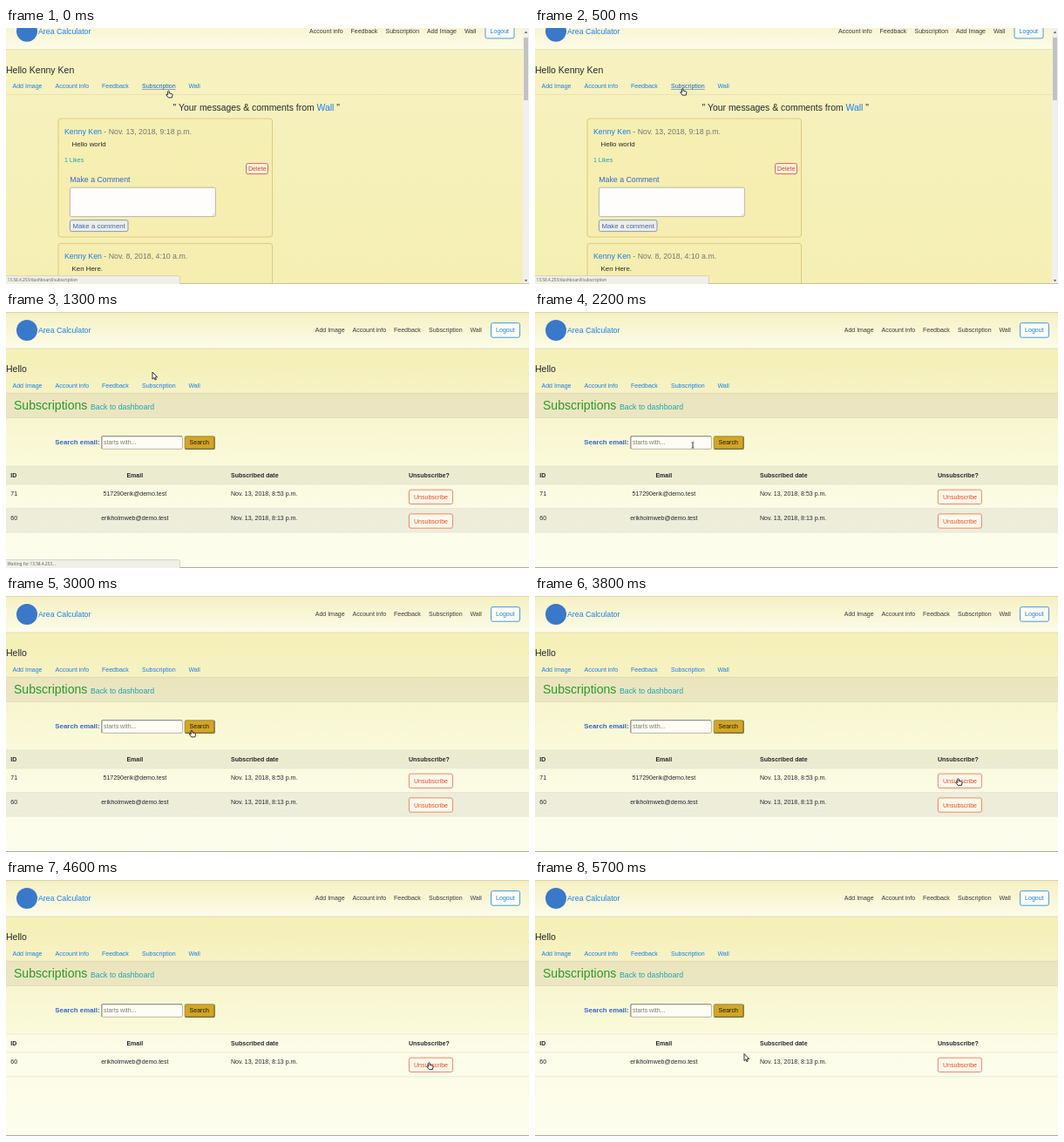
An HTML page with a canvas that plays this animation: 600x294 px, repeating every 5.8 s.

```html
<!DOCTYPE html>
<html lang="en">
<head>
<meta charset="utf-8">
<title>Subscriptions</title>
<style>
html, body { margin: 0; width: 100%; height: 100%; overflow: hidden; background: #f6f1bb; }
canvas { display: block; width: 600px; height: 294px; }
</style>
</head>
<body>
<canvas id="stage"></canvas>
<script>
const W = 600, H = 294, LOOP = 5800, STEP = 100;
const canvas = document.getElementById('stage');
const ctx = canvas.getContext('2d');
const dpr = window.devicePixelRatio || 1;
canvas.width = W * dpr;
canvas.height = H * dpr;

const SANS = '"Liberation Sans", Arial, sans-serif';
const UI = '"Noto Sans", sans-serif';
const BASE = 7.03, MID = 7.9, LEAD = 8.78, H4 = 10.5, H2 = 14.05;
const BLUE = '#1a7fe8', INK = '#25282b', GREY = '#74786f', TEAL = '#1fa3b0',
      ROYAL = '#3565cc', RED = '#d8404a', ORANGE = '#ea4a2c';
const USER = 'Kenny Ken', BRAND = 'Area Calculator';

// Draws text and returns the x where it ends.
function text(str, x, y, size = BASE, color = INK, opt = {}) {
  ctx.font = `${opt.bold ? 'bold ' : ''}${size}px ${opt.font || SANS}`;
  ctx.textAlign = opt.align || 'left';
  ctx.fillStyle = color;
  ctx.fillText(str, x, y);
  return x + ctx.measureText(str).width;
}

function rect(x, y, w, h, color) {
  ctx.fillStyle = color;
  ctx.fillRect(x, y, w, h);
}

function box(x, y, w, h, r, stroke, fill, line = 0.8) {
  ctx.beginPath();
  ctx.roundRect(x, y, w, h, r);
  if (fill) { ctx.fillStyle = fill; ctx.fill(); }
  ctx.lineWidth = line;
  ctx.strokeStyle = stroke;
  ctx.stroke();
}

function shade(y, h, ...colors) {
  const g = ctx.createLinearGradient(0, y, 0, y + h);
  colors.forEach((c, i) => g.addColorStop(i / (colors.length - 1), c));
  rect(0, y, W, h, g);
}

function poly(points, fill) {
  ctx.beginPath();
  points.forEach(([x, y]) => ctx.lineTo(x, y));
  ctx.closePath();
  ctx.fillStyle = fill;
  ctx.fill();
}

function header(top, right, links) {
  shade(top, 42, '#f5f0c0', '#f9f6d6', '#fdfce9');
  rect(0, top + 41.6, W, 0.8, '#dbd6ae');
  ctx.beginPath();
  ctx.arc(24, top + 21, 12, 0, Math.PI * 2);
  ctx.fillStyle = '#3a78c9';
  ctx.fill();
  text(BRAND, 37, top + 24, LEAD, BLUE);
  links.forEach(([label, x]) => text(label, x, top + 23.3, BASE, '#3a3b38'));
  box(right - 33, top + 12.6, 33, 16.6, 2, BLUE, '#fdfdf4');
  text('Logout', right - 27.4, top + 23.3, BASE, BLUE);
}

function tabs(y, hover) {
  const items = [['Add Image', 7.5], ['Account info', 56.5], ['Feedback', 110],
                 ['Subscription', 156], ['Wall', 209.5]];
  for (const [label, x] of items) {
    const on = hover === label;
    const end = text(label, x, y, BASE, on ? '#1263bd' : BLUE);
    if (on) rect(x, y + 0.8, end - x, 0.5, '#1263bd');
  }
}

function status(str) {
  box(-2, 284.6, 201.5, 12, 1.5, '#c9c8bd', '#f0efe8', 0.7);
  text(str, 1.5, 291.3, 4.75, '#66665f', { font: UI });
}

function cardHead(y, date, body) {
  const x = text(USER, 67, y + 17.7, LEAD, BLUE);
  text(' - ' + date, x, y + 17.7, LEAD, GREY);
  text(body, 75.5, y + 31.7, MID, INK);
}

function card(y) {
  box(60, y, 245.5, 136, 3, '#dcc378', 'rgba(245,236,168,0.45)', 0.9);
}

function scrollbar() {
  rect(593, 0, 7, H, '#f0f0ee');
  rect(594, 11, 5, 72, '#c2c2c0');
  poly([[594.8, 6], [598.2, 6], [596.5, 3.5]], '#666');
  poly([[594.8, 289], [598.2, 289], [596.5, 291.5]], '#666');
}

function dashboard(t) {
  shade(0, H, '#f7f2c2', '#f6f1bc', '#f5f0b7', '#f5efb4');
  header(-17.3, 583, [['Account info', 348], ['Feedback', 395.5],
    ['Subscription', 435.5], ['Add Image', 483], ['Wall', 526]]);
  text('Hello ' + USER, 0, 51.8, H4, INK);
  tabs(69.3, 'Subscription');
  rect(0, 76.2, 593, 0.7, '#e2ddb2');

  let x = text('" Your messages & comments from ', 191.5, 94.8, 10.4);
  x = text('Wall', x, 94.8, 10.4, BLUE);
  text(' "', x, 94.8, 10.4);

  card(104);
  cardHead(104, 'Nov. 13, 2018, 9:18 p.m.', 'Hello world');
  text('1 Likes', 67, 153.6, BASE, TEAL);
  box(275.5, 155.6, 25, 12, 2, RED, '#faf5d6');
  text('Delete', 278, 164.1, BASE, RED);
  text('Make a Comment', 73.3, 177.4, LEAD, ROYAL);
  box(73.4, 183.2, 167, 33.4, 2, '#a9a89c', '#fefdfb');
  ctx.beginPath();
  ctx.moveTo(236.6, 215.6); ctx.lineTo(239.4, 212.8);
  ctx.moveTo(238.2, 215.6); ctx.lineTo(239.4, 214.4);
  ctx.lineWidth = 0.5;
  ctx.stroke();
  box(73.4, 220.6, 66.6, 13, 2, '#6a7fd2', '#f0eee0');
  text('Make a comment', 76.4, 229.7, MID, ROYAL);

  card(247.4);
  cardHead(247.4, 'Nov. 8, 2018, 4:10 a.m.', 'Ken Here.');
  scrollbar();
  rect(0, 293.2, W, 0.8, '#b9b7a4');
  status(t < 700 ? '13.58.4.253/dashboard/subscription' : 'Waiting for 13.58.4.253...');
}

function row(y, [id, mail, date]) {
  text(id, 5.3, y + 13.4);
  text(mail, 147.8, y + 13.4, BASE, INK, { align: 'center' });
  text(date, 258, y + 13.4);
  box(462.4, y + 6.2, 50, 16.3, 2, '#ee6a4c', '#fdf9ea');
  text('Unsubscribe', 468, y + 16.8, BASE, ORANGE);
}

const PEOPLE = [
  ['71', '517290erik@demo.test', 'Nov. 13, 2018, 8:53 p.m.'],
  ['60', 'erikholmweb@demo.test', 'Nov. 13, 2018, 8:13 p.m.']
];

function subscriptions(t) {
  const full = t < 4600;
  shade(0, H, '#f4eeb4', '#f5efb9', '#f8f5cd', '#fafadb', '#fcfce8', '#fdfdee');
  header(0, 589.5, [['Add Image', 354.7], ['Account info', 397.5],
    ['Feedback', 445], ['Subscription', 485], ['Wall', 532.5]]);
  text('Hello', 0, 69, H4, INK);
  tabs(86.6);

  rect(0, 93, W, 28.4, 'rgba(226,219,184,0.55)');
  rect(0, 92.8, W, 0.7, '#dcd6b0');
  rect(0, 121, W, 0.7, '#dcd8b8');
  text('Subscriptions', 9, 111.8, H2, '#27992c');
  text('Back to dashboard', 97, 111.8, LEAD, TEAL);

  text('Search email:', 56.3, 152.3, MID, ROYAL, { bold: true });
  box(109.8, 142.6, 92.6, 14.8, 1.5, '#a5a499', '#fdfdf6');
  rect(110, 142.4, 92, 0.8, '#7f7e76');
  rect(109.5, 143, 0.8, 14, '#7f7e76');
  text('starts with...', 112, 152.2, BASE, '#7d7d78');
  box(205.2, 142.8, 34, 14.6, 1.5, '#8d7a3c', '#d3a524');
  rect(205.6, 156.8, 33.6, 0.9, '#5f5430');
  rect(238.7, 143.2, 0.8, 14, '#5f5430');
  text('Search', 210.6, 152.3, BASE, '#1d1a10');

  if (full) {
    rect(0, 177, W, 21, 'rgba(0,0,0,0.06)');
    rect(0, 225.6, W, 27.6, 'rgba(0,0,0,0.06)');
  } else {
    rect(0, 177, W, 49, 'rgba(255,255,255,0.25)');
  }
  const lines = full ? [177, 198, 225.6, 253] : [177, 198, 225.8];
  lines.forEach(y => rect(0, y - 0.3, W, 0.6, '#dfe0d3'));
  const bold = { bold: true };
  text('ID', 5.3, 190, BASE, INK, bold);
  text('Email', 147.8, 190, BASE, INK, { bold: true, align: 'center' });
  text('Subscribed date', 258, 190, BASE, INK, bold);
  text('Unsubscribe?', 462, 190, BASE, INK, bold);
  (full ? PEOPLE : PEOPLE.slice(1)).forEach((p, i) => row(198 + i * 27.7, p));

  rect(0, 0, W, 0.7, '#c9c7b4');
  rect(0, 293, W, 0.9, '#a5a49a');
  if (t < 1600) status('Waiting for 13.58.4.253...');
}

const ARROW = new Path2D('M0 0V8.1L1.8 6.4L3 9L4.3 8.4L3.2 5.9H5.6Z');
const HAND = new Path2D('M-.8 .7Q0 -.5 .8 .7V3L3.7 3.6Q4.6 3.9 4.5 4.9L3.9 7.9H-.3L-2.6 4.9Q-2.7 3.8 -1.6 4.2L-.8 5Z');
const BEAM = new Path2D('M-1.4 -3.2Q0 -3.2 0 -2.5Q0 -3.2 1.4 -3.2M0 -2.5V2.5M-1.4 3.2Q0 3.2 0 2.5Q0 3.2 1.4 3.2');

// time, x, y of the pointer's hot spot
const PATH = [
  [0, 186.5, 72], [600, 168, 69], [1300, 168, 69], [1800, 181, 153],
  [2500, 181, 153], [3000, 213, 154], [3600, 485.5, 209.5],
  [5100, 485.5, 209.5], [5700, 240, 199.5]
];

function pointerAt(t) {
  const i = PATH.findIndex(k => k[0] > t);
  if (i < 0) return PATH[PATH.length - 1].slice(1);
  const [t0, x0, y0] = PATH[i - 1], [t1, x1, y1] = PATH[i];
  const u = (t - t0) / (t1 - t0), e = u * u * (3 - 2 * u);
  return [x0 + (x1 - x0) * e, y0 + (y1 - y0) * e];
}

function pointer(t) {
  const [x, y] = pointerAt(t);
  const over = (l, r, top, bottom) => x > l && x < r && y > top && y < bottom;
  const beam = over(110, 203, 143, 158);
  const hand = t < 700 || over(205, 240, 142, 158) || over(462, 513, 204, 221);
  ctx.save();
  ctx.translate(x, y);
  ctx.lineJoin = 'round';
  if (beam) {
    ctx.strokeStyle = '#222';
    ctx.lineWidth = 0.9;
    ctx.stroke(BEAM);
  } else {
    const shape = hand ? HAND : ARROW;
    ctx.fillStyle = '#fff';
    ctx.fill(shape);
    ctx.strokeStyle = '#1c1c1c';
    ctx.lineWidth = 0.9;
    ctx.stroke(shape);
  }
  ctx.restore();
}

function draw(now) {
  const t = Math.floor((now % LOOP) / STEP) * STEP;
  ctx.setTransform(dpr, 0, 0, dpr, 0, 0);
  (t < 1300 ? dashboard : subscriptions)(t);
  pointer(t);
}

let start;
function tick(now) {
  start ??= now;
  draw(Math.max(0, now - start));
  requestAnimationFrame(tick);
}
draw(0);
requestAnimationFrame(tick);
</script>
</body>
</html>
```
